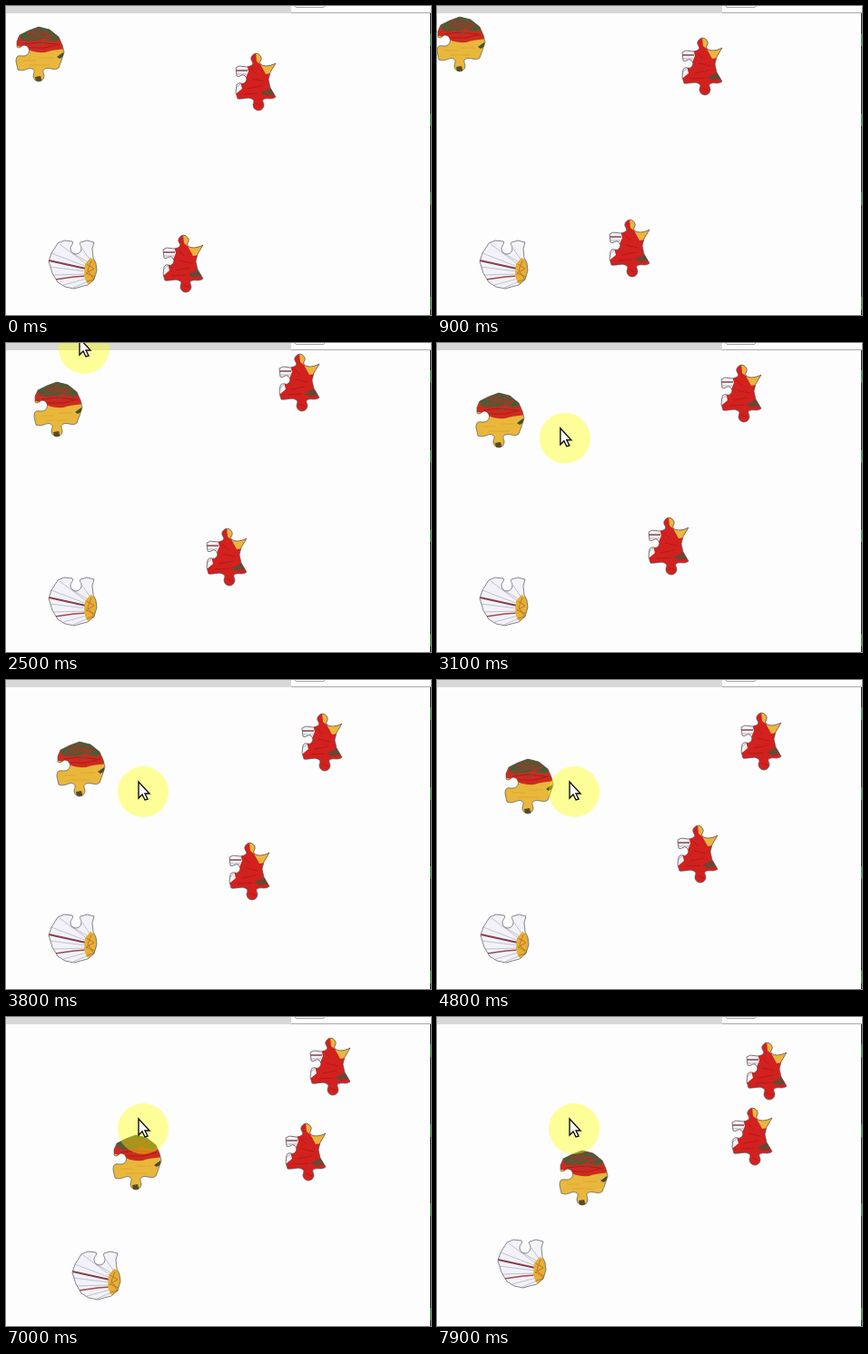
Write an HTML page with a canvas that moves like this. It is 468x340 px and loops after 8000 ms.

```html
<!DOCTYPE html>
<html>
<head>
<meta charset="utf-8">
<style>
html, body { margin: 0; width: 468px; height: 340px; overflow: hidden; background: #fdfdfd; }
canvas { display: block; }
</style>
</head>
<body>
<canvas id="stage" width="468" height="340"></canvas>
<script>
const ctx = document.getElementById('stage').getContext('2d');
const LOOP = 8000, STEP = 100;

const fill = (path, color) => ({ path: new Path2D(path), color });
const line = (path, color, width = 1) => ({ path: new Path2D(path), color, width });

// Each piece: an outline and the drawing clipped inside it
const yellowPiece = {
  outline: new Path2D('M1 22L1 16 4 9 14 4 25 0 37 3 47 11 51 20 53 28 50 37 47 45' +
    'C42 49 38 44 32 46C28 48 31 51 31 54A6 6 0 0 1 19 54C19 51 22 48 18 46C13 44 9 50 2 47' +
    'L0 38C0 30 4 32 8 32A6 6 0 0 0 9 20C6 20 5 25 1 22Z'),
  parts: [
    fill('M-1-1H55V62H-1Z', '#e9b73c'),
    fill('M-1-1H55V24Q40 25 32 28Q18 29 10 23L-1 20Z', '#cf2a20'),
    fill('M4 9L25-1 39 2 49 14Q39 16 31 13Q17 18 6 15Z', '#4b5c34'),
    line('M7 15L20 8 33 7M14 16L24 10 37 10M12 8L27 3M28 14L42 8M40 16L33 4', '#a8352a', 1.4),
    line('M8 19L25 17 45 19M12 23L32 23 48 19', '#a91c19', 1),
    line('M23 20L35 15 46 16', '#526038', 1),
    fill('M45 33L52 28 53 32 48 35Z', '#44502f'),
    fill('M21 55L27 54 29 61H22Z', '#554b26'),
    line('M8 37H22M26 34H42M14 42H37', '#dfa72f', 1)
  ]
};

const redPiece = {
  outline: new Path2D('M0 16L4 14 12 15C18 14 20 12 18 9A5.5 5.5 0 1 1 27 9C25 14 35 16 44 11' +
    'L38 21 36 29 38 38 44 48C39 52 35 48 30 51C29 53 31 55 31 57A6 6 0 0 1 19 57C19 55 21 53 19 51' +
    'C14 47 9 51 2 50L0 43 1 35C3 31 7 34 9 33A5 5 0 0 0 9 24C6 23 4 27 1 25Z'),
  parts: [
    fill('M-1-1H46V64H-1Z', '#d2211e'),
    fill('M-1 12H12L14 20 11 27H-1Z', '#f3f3f7'),
    fill('M-1 31H5L7 39 1 44H-1Z', '#f3f3f7'),
    line('M0 19H13', '#8b4149', 1.5),
    line('M1 23H12M0 38L5 34', '#a0a1ac', .8),
    fill('M22-1H30V9L27 12 33 23 39 22 46 10 28 13 23 9Z', '#ecb63d'),
    fill('M28 43L39 38 43 45 31 46Z', '#565037'),
    line('M27 45L41 40M33 47L42 45', '#a62c23', 1),
    line('M17 17L23 23M18 28L31 31M13 39L29 36M9 45L25 44M22 55L29 58', '#b31a1a', 1)
  ]
};

const whitePiece = {
  outline: new Path2D('M0 23L3 14 10 3 17 0 26 1C28 4 24 5 24 9A6 6 0 0 0 36 9' +
    'C36 5 33 4 35 2L42 0 50 2 48 9 49 19 52 25 53 33 50 43 43 49 35 51 28 53 18 51 10 46 4 36Z'),
  parts: [
    fill('M-1-1H55V55H-1Z', '#f2f2f8'),
    line('M3 14L42 29M12 4L43 27M25 13L45 25M37 9L46 22M1 29L41 34M5 38L40 37M16 49L42 42M27 52L43 45',
      '#b9bdca', .9),
    line('M0 22L41 31', '#873d4a', 1.8),
    line('M7 43L28 40 42 39', '#a34850', 1.4),
    fill('M46 19L40 26 39 39 42 47 47 49 55 39 52 22Z', '#e5ae35'),
    line('M42 26L50 31 41 36 51 40M47 22L43 33 50 43 42 45', '#bb7a2b', 1)
  ]
};

// Tracks hold [time, x, y] corners joined by straight runs
const pieces = [
  [yellowPiece, [[0, 11, 23], [735, -3, 9], [8000, 137, 149]]],
  [redPiece, [[0, 253, 52], [2290, 297, 8], [4260, 335, 46], [6230, 335, 8],
    [7590, 335, 34.3], [8000, 343, 26.4]]],
  [redPiece, [[0, 173, 252], [8000, 327, 98]]],
  [whitePiece, [[0, 47, 258], [4750, 47, 258], [6308, 93.7, 258], [7200, 67, 258], [8000, 67, 243]]]
];

const mix = (a, b, k) => a + (b - a) * k;

function along(track, t) {
  const i = Math.max(1, track.findIndex(key => key[0] >= t));
  const [t0, x0, y0] = track[i - 1], [t1, x1, y1] = track[i];
  const k = (t - t0) / (t1 - t0);
  return [Math.round(mix(x0, x1, k)), Math.round(mix(y0, y1, k))];
}

function drawPiece({ outline, parts }, [x, y]) {
  ctx.save();
  ctx.translate(x, y);
  ctx.save();
  ctx.clip(outline);
  for (const { path, color, width } of parts) {
    ctx.fillStyle = ctx.strokeStyle = color;
    ctx.lineWidth = width || 1;
    width ? ctx.stroke(path) : ctx.fill(path);
  }
  ctx.restore();
  ctx.strokeStyle = '#55545a';
  ctx.lineWidth = .7;
  ctx.stroke(outline);
  ctx.restore();
}

function rect(color, x, y, w, h) {
  ctx.fillStyle = color;
  ctx.fillRect(x, y, w, h);
}

function drawWindow() {
  rect('#fdfdfd', 0, 0, 468, 340);
  rect('#d8d8d8', 0, 0, 314, 8);
  rect('#aaa', 314, 7, 154, 1);
  rect('#a5a5a5', 319, 1, 31, 1);
  rect('#a5a5a5', 318, 0, 1, 1);
  rect('#a5a5a5', 350, 0, 1, 1);
  rect('#222', 467, 8, 1, 332);
  for (const y of [30, 118, 205, 320]) rect('#258c35', 467, y, 1, 14);
}

const arrow = new Path2D('M-5-11V7L-1 3 2 9 5 8 2 2H7Z');

function drawCursor(t) {
  if (t < 2300) return;
  let x, y;
  if (t < 2500) [x, y] = along([[2300, 50, -40], [2500, 86, 6]], t);
  else {
    const k = Math.min(1, (t - 2500) / 800), ease = k * k * (3 - 2 * k);
    x = mix(86, 151, ease);
    y = mix(6, 123, ease);
  }
  ctx.save();
  ctx.translate(x, y);
  ctx.fillStyle = 'rgba(255,255,0,.4)';
  ctx.beginPath();
  ctx.arc(0, 0, 28, 0, Math.PI * 2);
  ctx.fill();
  ctx.fillStyle = '#fff';
  ctx.fill(arrow);
  ctx.strokeStyle = '#111';
  ctx.lineWidth = 1.4;
  ctx.stroke(arrow);
  ctx.restore();
}

const start = performance.now();

function draw() {
  const t = Math.floor((performance.now() - start) % LOOP / STEP) * STEP;
  drawWindow();
  for (const [piece, track] of pieces) drawPiece(piece, along(track, t));
  drawCursor(t);
  requestAnimationFrame(draw);
}
draw();
</script>
</body>
</html>
```
